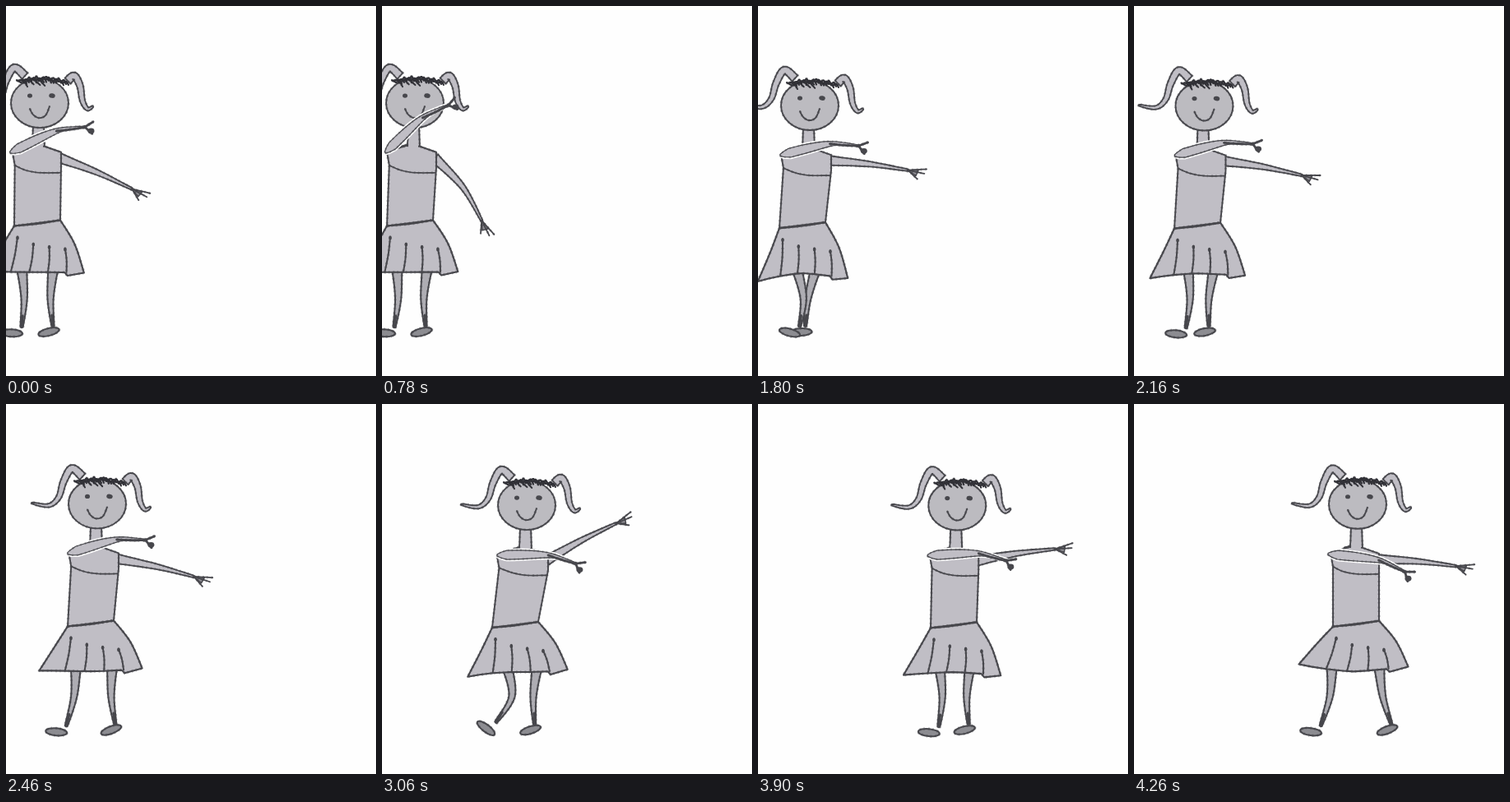
These frames come from a looping animation (450x450 px, 4.32 s). An HTML page with a canvas:

```html
<!DOCTYPE html>
<html lang="en">
<head>
<meta charset="utf-8">
<title>Walking girl drawing</title>
<style>
html, body { margin: 0; width: 100%; height: 100%; overflow: hidden; background: #fefefe; }
canvas { display: block; width: 100%; height: 100%; }
</style>
</head>
<body>
<canvas id="stage" width="450" height="450"></canvas>
<script>
const ctx = document.getElementById('stage').getContext('2d');
const LOOP = 4320, STEP = 60, CYCLE = 1740;
const SKIN = '#c0bec5', HEAD = '#bcbbc0', LEG = '#aeadb3', SHOE = '#8c8c91';
const INK = '#47474c', HAIR = '#313137', PAPER = '#fefefe';

// Key poses: time, neck x, body sway, near arm angle, far arm angle.
const KEYS = [
  [0, 39, -1, -25, 21],
  [780, 38, -4, -43, 46],
  [1080, 41, -5, -35, 10],
  [1800, 61, -7, -13, 5],
  [2460, 109, -6, -16, 11],
  [3060, 174, -12, 0, -30],
  [3540, 211, -5, -8, -22],
  [4260, 270, 0, 7, 3]
];

const mix = (a, b, u) => a + (b - a) * u;
const smooth = (a, b, t) => {
  const u = Math.max(0, Math.min(1, (t - a) / (b - a)));
  return u * u * (3 - 2 * u);
};

// Monotone cubic interpolation of one column of the key poses.
function track(col, t) {
  const last = KEYS.length - 1;
  let i = 0;
  while (i < last - 1 && t > KEYS[i + 1][0]) i++;
  const slope = k => (KEYS[k + 1][col] - KEYS[k][col]) / (KEYS[k + 1][0] - KEYS[k][0]);
  const tangent = k => {
    const a = slope(Math.max(0, k - 1)), b = slope(Math.min(last - 1, k));
    return a * b <= 0 ? 0 : 2 * a * b / (a + b);
  };
  const h = KEYS[i + 1][0] - KEYS[i][0];
  const u = Math.min(1, (t - KEYS[i][0]) / h), u2 = u * u, u3 = u2 * u;
  return mix(KEYS[i][col], KEYS[i + 1][col], 3 * u2 - 2 * u3)
    + h * ((u3 - 2 * u2 + u) * tangent(i) + (u3 - u2) * tangent(i + 1));
}

// Everything below the neck follows from the stride and the sway.
function poseAt(t) {
  const phase = (t - 1800) / CYCLE;
  const stride = 5 + (61 + (t - 2460) * 0.0133) * Math.sin(Math.PI * phase) ** 2;
  const spread = mix(36, stride, smooth(900, 1700, t));
  const lift = smooth(1000, 2600, t) * (0.5 + 0.5 * Math.cos(2 * Math.PI * (phase - 0.8)));
  const drop = mix(-3, 3, smooth(900, 3200, t)) + (30 - spread) * 0.04;
  const sway = track(2, t);
  return { x: track(1, t), sway, near: track(3, t), far: track(4, t), spread, lift, drop };
}

const polar = ([x, y], deg, len) => {
  const a = deg * Math.PI / 180;
  return [x + Math.cos(a) * len, y + Math.sin(a) * len];
};

function polygon(pts, closed = true) {
  const path = new Path2D();
  pts.forEach(q => path.lineTo(...q));
  if (closed) path.closePath();
  return path;
}

// Points of a smooth line through the given ones.
function spline(pts, steps = 8) {
  const at = k => pts[Math.max(0, Math.min(pts.length - 1, k))];
  const out = [pts[0]];
  for (let i = 0; i < pts.length - 1; i++) {
    const [a, b, c, d] = [at(i - 1), at(i), at(i + 1), at(i + 2)];
    for (let k = 1; k <= steps; k++) {
      const u = k / steps;
      out.push([0, 1].map(j => b[j] + 0.5 * u * (c[j] - a[j]
        + u * (2 * a[j] - 5 * b[j] + 4 * c[j] - d[j] + u * (3 * (b[j] - c[j]) + d[j] - a[j])))));
    }
  }
  return out;
}

const line = (...pts) => polygon(spline(pts), false);

// Band of varying width along a smooth spine.
function ribbon(spine, width) {
  const mid = spline(spine), n = mid.length - 1, left = [], right = [];
  mid.forEach(([x, y], i) => {
    const a = mid[Math.max(0, i - 1)], b = mid[Math.min(n, i + 1)];
    const dx = b[0] - a[0], dy = b[1] - a[1];
    const w = width(i / n) / 2 / Math.hypot(dx, dy);
    left.push([x - dy * w, y + dx * w]);
    right.unshift([x + dy * w, y - dx * w]);
  });
  return polygon(left.concat(right));
}

function ellipse(x, y, rx, ry, tilt = 0) {
  const path = new Path2D();
  path.ellipse(x, y, rx, ry, tilt * Math.PI / 180, 0, Math.PI * 2);
  return path;
}

function fill(path, color) {
  ctx.fillStyle = color;
  ctx.fill(path);
}

// A pen line with a slightly rough edge.
function ink(path, width = 1.9, color = INK) {
  ctx.save();
  ctx.strokeStyle = color;
  ctx.lineWidth = width;
  ctx.stroke(path);
  ctx.lineCap = 'butt';
  ctx.globalAlpha = 0.4;
  ctx.lineWidth = width + 1.3;
  ctx.setLineDash([2, 3, 1.5, 4]);
  ctx.stroke(path);
  ctx.restore();
}

function shape(path, color = SKIN, width) {
  fill(path, color);
  ink(path, width);
}

function leg(hipX, ankle, bend, shoeDx, tilt) {
  const knee = [(hipX + ankle[0]) / 2 + bend, 356];
  shape(ribbon([[hipX, 320], knee, ankle], s => 13 - 10 * Math.pow(s, 0.8)), LEG, 2);
  ink(line([mix(knee[0], ankle[0], 0.6), mix(knee[1], ankle[1], 0.6)], ankle), 3);
  shape(ellipse(ankle[0] + shoeDx, ankle[1] + 7, 13, 4.5, tilt), SHOE, 2);
}

function legs({ sway, spread, lift, drop }) {
  const footR = sway + spread / 2 + 1, footL = sway - spread / 2 - 1;
  leg(11.5 + spread * 0.2 + sway * 0.5, [footR, 389.5], -3, -5, -0.4 * Math.min(50, spread));
  leg(-12.5 - spread * 0.2, [footL, 392 + drop * 0.4 - 6 * lift], 3 + 10 * lift, -12, 3 + 36 * lift);
}

function farArm({ far, drop }) {
  const shoulder = [26, 188 + drop];
  const bent = far + 4 + Math.max(0, far - 20) * 0.4;
  const elbow = polar(shoulder, far, 49), wrist = polar(elbow, bent, 47);
  shape(ribbon([shoulder, elbow, wrist], s => 2.5 + 9.5 * Math.pow(1 - s, 1.3)), SKIN, 1.8);
  shape(polygon([wrist, polar(wrist, bent - 10, 13), polar(wrist, bent + 26, 12)]), '#8f8e94', 1.4);
  for (const turn of [-12, 3, 34]) ink(line(wrist, polar(wrist, bent + turn, 21 - turn * 0.15)), 1.8);
}

function nearArm({ near, drop }) {
  const shoulder = [-34, 181.5 + drop], bent = near + 17;
  const elbow = polar(shoulder, near, 62), wrist = polar(elbow, bent, 35);
  const arm = ribbon([shoulder, elbow, wrist], s => Math.min(1, 0.2 + s * 7) * (11 - 8.5 * smooth(0.2, 0.75, s)));
  ctx.strokeStyle = PAPER;
  ctx.lineWidth = 4.5;
  ctx.stroke(arm);
  shape(arm, SKIN, 1.2);
  ink(line(elbow, polar(elbow, bent + 2, 18), wrist), 2.8);
  for (const turn of [-24, 50]) ink(line(wrist, polar(wrist, bent + turn, 12)), 2.8);
  fill(ellipse(...polar(wrist, bent + 40, 9), 4, 3.4), INK);
}

function waist({ sway, drop }) {
  const y = 266.5 + drop * 0.8;
  return { x: sway, y, left: [sway - 28, y + 3.5], right: [sway + 28, y - 3.5] };
}

function skirt(p) {
  const { x, y, left, right } = waist(p);
  const mid = p.sway * 0.5 - 3, half = 54 + p.spread * 0.15;
  const edge = 334 + p.drop - p.spread * 0.2, tilt = (p.sway + 3) / 2;
  const hem = (u, dy = 0) => {
    const side = Math.abs(u - 0.5) * 2;
    return [mid + half * (2 * u - 1), mix(325 + p.drop * 0.4, edge + tilt * (2 * u - 1), side ** 1.4) + dy];
  };
  const flare = (a, b, dx) => spline([a, [(a[0] + b[0]) / 2 + dx, (a[1] + b[1]) / 2 - 3], b]);
  const base = [0, 0.12, 0.25, 0.4, 0.5, 0.62, 0.8].map(u => hem(u));
  shape(polygon([...flare(left, hem(0), 2), ...base, hem(0.83, 4), ...flare(hem(1), right, 3)]), SKIN, 2.1);
  for (let i = 0; i < 4; i++) {
    const top = [x - 24 + 19.3 * i, y + 17 + 14 * Math.sqrt(i / 3)], end = hem(0.25 + 0.19 * i);
    ink(line(top, [(top[0] + end[0]) / 2 + 1, (top[1] + end[1]) / 2], end), 2);
    fill(ellipse(top[0], top[1] + 1, 1.8, 2.6), INK);
  }
}

function torso(p) {
  const { x, y, left, right } = waist(p);
  const side = -28 + p.sway * 0.3;
  shape(polygon([[-6, 146], [7, 146], [8, 176], [-7, 176]].map(([a, b]) => [a, b + p.drop])));
  ctx.save();
  ctx.translate(0, p.drop);
  const low = ([a, b]) => [a, b - p.drop];
  shape(polygon([[side - 3, 180], [-8, 173], [8, 174], [28, 181], [28, 200], low(right), low(left), [side, 197]]));
  fill(polygon([[-6, 168], [6, 168], [6, 177], [-6, 177]]), SKIN);
  ink(line([side, 197], [-15, 203], [3, 206], [27, 206]), 1.7);
  ink(line([-14, 174], [-7, 172]), 2.4);
  ctx.restore();
  ink(line(left, [x, y + 1], right), 2.2);
}

function hair() {
  let seed = 7;
  const rand = r => ((seed = seed * 16807 % 2147483647) / 2147483647 - 0.5) * 2 * r;
  const top = x => -29 + x * x * 0.005;
  for (let x = -25; x <= 33; x += 3) {
    const y = top(x);
    ink(line([x - 3, y + rand(2)], [x, y - 2 + rand(2)], [x + 3, y + 2 + rand(2)]), 2.2, HAIR);
  }
  for (let x = -19; x <= 2; x += 6) ink(line([x, top(x)], [x + 5 + rand(3), top(x) + 7 + rand(3)]), 2, HAIR);
}

function head(p) {
  ctx.save();
  ctx.translate(2, 121 + p.drop * 0.9);
  const taper = s => 1 + 9 * Math.pow(1 - s, 0.6);
  shape(ribbon([[-18, -33], [-31, -43], [-41, -27], [-47, -8], [-59, 2], [-80, -1]], taper), SKIN, 1.8);
  shape(ribbon([[34, -27], [42, -33], [49, -21], [52, -3], [58, 7], [65, 4]], taper), SKIN, 1.8);
  shape(ellipse(0, 0, 35, 30), HEAD, 1.9);
  hair();
  fill(ellipse(-12, -9, 3, 2.6), INK);
  fill(ellipse(15, -9, 3.8, 2.8, 10), INK);
  ink(line([-12, 7], [-8, 14], [-1, 18], [7, 15], [12, 4]), 1.9);
  ctx.restore();
}

function draw(t) {
  const p = poseAt(t);
  ctx.fillStyle = PAPER;
  ctx.fillRect(0, 0, 450, 450);
  ctx.lineJoin = ctx.lineCap = 'round';
  ctx.save();
  ctx.translate(p.x, 0);
  for (const part of [legs, farArm, skirt, torso, head, nearArm]) part(p);
  ctx.restore();
}

const start = performance.now();
function tick() {
  const t = (performance.now() - start) % LOOP;
  draw(Math.floor(t / STEP) * STEP);
  requestAnimationFrame(tick);
}
tick();
</script>
</body>
</html>
```
